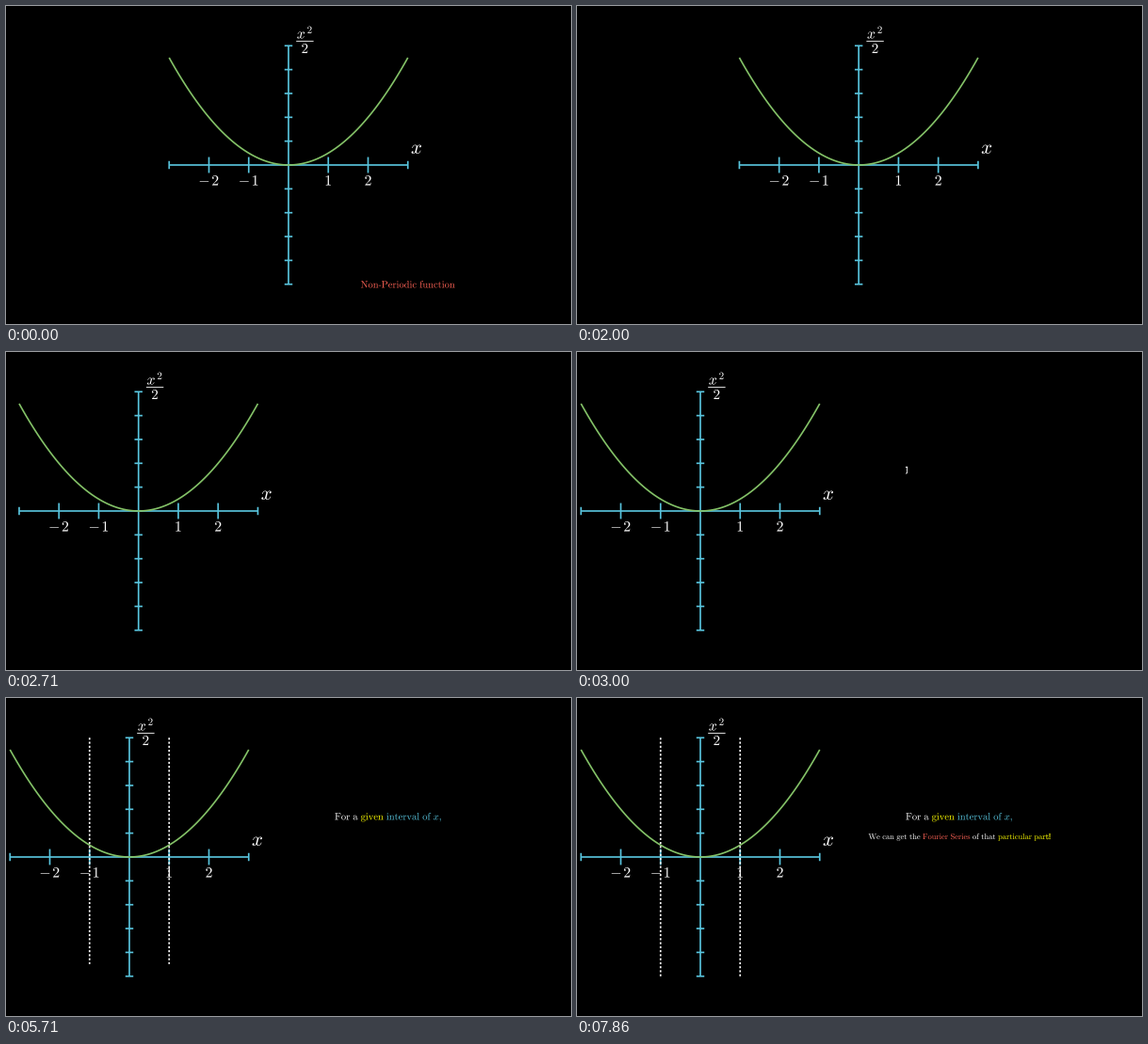
A matplotlib script for the animation above (8000 ms loop, 600 px wide and 338 px high).

```python
import matplotlib.pyplot as plt
import numpy as np
from matplotlib import rcParams
from matplotlib.animation import FuncAnimation
from matplotlib.patches import PathPatch, Rectangle
from matplotlib.path import Path
from matplotlib.text import Text
from matplotlib.textpath import text_to_path
from matplotlib.transforms import Affine2D

rcParams["mathtext.fontset"] = "cm"
rcParams["path.snap"] = False

W, H = 600, 338
UNIT = H / 8                  # the stage is 8 units high
CX, CY = W / 2, H / 2
PT = 0.72                     # points per pixel at 100 dpi
EM = 21                       # full text size
LINE = 0.04 * UNIT
BORDER = 0.02 * UNIT
FPS, POSES = 7, 56
BLUE, GREEN, RED, YELLOW, WHITE = "#58C4DD", "#83C167", "#FC6255", "#FFFF00", "#FFFFFF"

FADE_AT, SHIFT_AT, WRITE_1, DASH_AT, WRITE_2 = 0.945, 1.945, 2.945, 4.935, 5.945

fig = plt.figure(figsize=(6, 3.38), dpi=100, facecolor="black")
ax = fig.add_axes([0, 0, 1, 1])
ax.set_xlim(0, W)
ax.set_ylim(H, 0)
ax.axis("off")

FONT = Text().get_fontproperties()
shift = Affine2D()
graph = shift + ax.transData


def clamp(v):
    return min(max(v, 0), 1)


def smooth(t):
    """Sigmoid easing from 0 to 1."""
    sig = lambda v: 1 / (1 + np.exp(-v))
    low = sig(-5)
    return clamp((sig(10 * (clamp(t) - 0.5)) - low) / (1 - 2 * low))


def glyphs(tex, em, cx, cy):
    """One path per letter, with the ink centred on (cx, cy)."""
    info, shapes, _ = text_to_path.get_glyphs_mathtext(FONT, f"${tex}$")
    scale = em / 100
    paths = []
    for key, x, y, size in info:
        verts, codes = shapes[key]
        if len(verts):
            pts = (np.array(verts) * size + (x, y)) * (scale, -scale)
            paths.append(Path(pts, codes))
    box = Path.make_compound_path(*paths).get_extents()
    move = Affine2D().translate(cx - (box.x0 + box.x1) / 2,
                                cy - (box.y0 + box.y1) / 2)
    return [p.transformed(move) for p in paths]


def fill(path, color, transform=None):
    patch = PathPatch(path, facecolor=color, linewidth=0,
                      transform=transform or ax.transData)
    return ax.add_patch(patch)


def stroke(x, y, color, width, transform=None, **kw):
    return ax.plot(x, y, color=color, lw=width * PT, solid_capstyle="butt",
                   transform=transform or ax.transData, **kw)[0]


def label(tex, em, cx, cy):
    for path in glyphs(tex, em, cx, cy):
        fill(path, WHITE, graph)


def trace(polys, share):
    """The first part of the outlines, by length."""
    runs = [np.r_[0, np.cumsum(np.hypot(*np.diff(p, axis=0).T))] for p in polys]
    left = share * sum(r[-1] for r in runs)
    parts = []
    for p, run in zip(polys, runs):
        if left <= 0:
            break
        end = [np.interp(left, run, p[:, k]) for k in (0, 1)]
        parts += [p[run < left], [end], [[np.nan, np.nan]]]
        left -= run[-1]
    return np.concatenate(parts) if parts else np.empty((0, 2))


class Writing:
    """Letters whose borders are drawn one after another, then filled."""

    def __init__(self, tex, em, cx, cy, start, colors):
        self.start = start
        self.letters = []
        tints = [c for c, n in colors for _ in range(n)]
        for path, tint in zip(glyphs(tex, em, cx, cy), tints):
            polys = [np.array(p) for p in path.to_polygons()]
            self.letters.append((fill(path, tint), stroke([], [], tint, BORDER), polys))

    def update(self, t, run_time=2):
        n = len(self.letters)
        lag = 4 / (n + 1)
        head = (t - self.start) / run_time * (1 + (n - 1) * lag)
        for i, (body, border, polys) in enumerate(self.letters):
            a = clamp(head - i * lag)
            filled = clamp(2 * a - 1)
            body.set_alpha(filled)
            body.set_visible(filled > 0)
            border.set_visible(0 < a < 1)
            if 0 < a < 1:
                border.set_data(*trace(polys, clamp(2 * a)).T)
                border.set_linewidth(BORDER * (1 - filled) * PT)


def build_graph():
    half, tick = 3 * UNIT, 0.1 * UNIT
    axis = dict(color=BLUE, width=LINE, transform=graph)
    stroke([CX - half, CX + half], [CY, CY], **axis)
    stroke([CX, CX], [CY - half, CY + half], **axis)
    for n in (-3, -2, -1, 1, 2, 3):
        x = CX + n * UNIT
        size = tick if abs(n) == 3 else 2 * tick
        stroke([x, x], [CY - size, CY + size], **axis)
        if abs(n) < 3:
            sign = r"-\hspace{0.12}" if n < 0 else ""
            label(f"{sign}{abs(n)}", 0.75 * EM, x, 185.3)
    for n in range(-5, 6):
        y = CY + n * half / 5
        stroke([CX - tick, CX + tick], [y, y], **axis)

    x = np.linspace(-3, 3, 121)
    stroke(CX + x * UNIT, CY - x**2 / 2 * half / 5, GREEN, LINE, graph)

    label("x", EM, CX + 135.8, 152.3)
    label("x", 0.76 * EM, CX + 13.2, 31)
    label("2", 0.52 * EM, CX + 22.4, 25.2)
    label("2", 0.72 * EM, CX + 17.3, 45)
    ax.add_patch(Rectangle((CX + 8.2, 36.9), 18.4, 0.9, color=WHITE, lw=0,
                           transform=graph))


def build_note():
    em = EM / 2
    paths = glyphs(r"\mathrm{Non}\hspace{0.333}\mathrm{Periodic\ function}",
                   em, CX + 3 * UNIT, CY + 3 * UNIT)
    parts = [fill(p, RED) for p in paths]
    base = paths[0].get_extents().y1
    left = paths[2].get_extents().x1 + 0.03 * em
    hyphen = Rectangle((left, base - 0.245 * em), 0.265 * em, 0.058 * em,
                       facecolor=RED, lw=0)
    return parts + [ax.add_patch(hyphen)]


def dashes(share, count=60):
    """Ends of the dashes drawn so far, top to bottom."""
    top, length = CY - 3 * UNIT, 6 * UNIT
    period = length / (count - 0.5)
    done = share * count
    ys = []
    for n in range(int(np.ceil(done))):
        y = top + n * period
        ys += [y, y + min(done - n, 1) * period / 2, np.nan]
    return ys


build_graph()
note = build_note()
walls = [stroke([], [], WHITE, LINE) for _ in range(2)]
lines = [
    Writing(r"\mathrm{For\ a\ given\ interval\ of}\ x,", EM / 2,
            CX + 2.5 * UNIT, CY - UNIT, WRITE_1,
            [(WHITE, 4), (YELLOW, 5), (BLUE, 12)]),
    Writing(r"\mathrm{We\ can\ get\ the\ Fourier\ Series\ of\ that\ particular\ part!}",
            0.4 * EM, CX + 2.51 * UNIT, CY - UNIT / 2, WRITE_2,
            [(WHITE, 11), (RED, 13), (WHITE, 6), (YELLOW, 15)]),
]


def draw(i):
    # poses are held: seven per second
    t = min((i + 1) * FPS // 25, POSES - 1) / FPS

    for part in note:
        part.set_alpha(1 - smooth(t - FADE_AT))

    shift.clear().translate(-4 * UNIT * smooth(t - SHIFT_AT), 0)

    ys = dashes(smooth(t - DASH_AT))
    for wall, x in zip(walls, (-5, -3)):
        wall.set_data(np.full(len(ys), CX + x * UNIT), ys)

    for line in lines:
        line.update(t)
    return []


anim = FuncAnimation(fig, draw, frames=200, interval=40, init_func=lambda: draw(0),
                     repeat=True, repeat_delay=0, blit=False)
plt.show()
```
